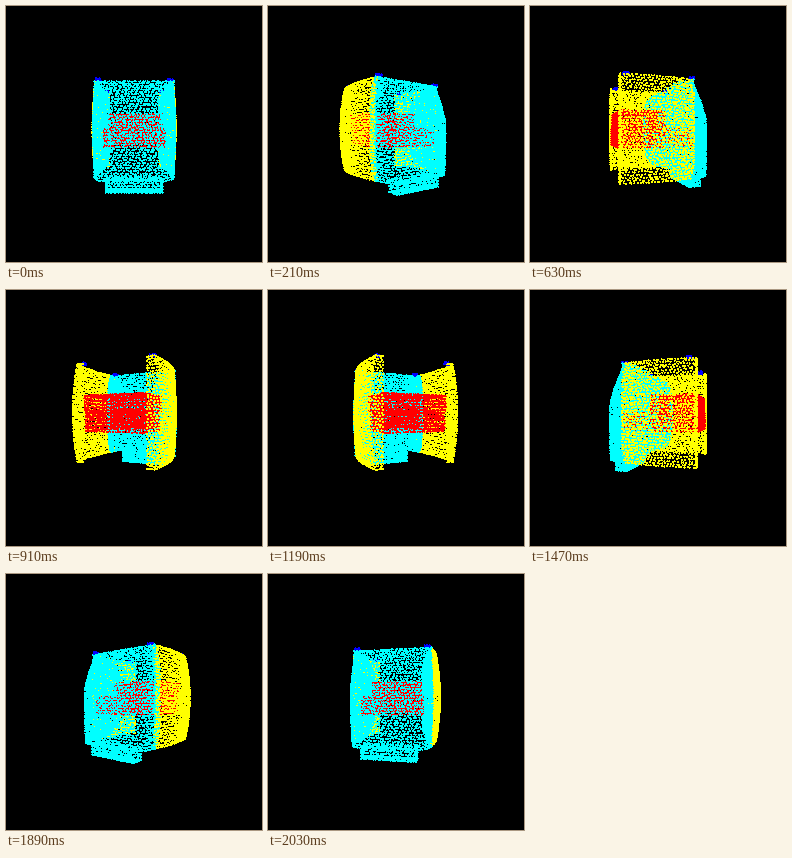
These frames come from a looping animation (256x256 px, 2.1 s). A matplotlib script:

```python
import numpy as np
import matplotlib.pyplot as plt
from matplotlib.animation import FuncAnimation

SIZE, STEPS, INTERVAL = 256, 30, 70
CAM, CX, CY = 220.0, 127.6, 125.7
DOT = 1.1
TOP, BOTTOM = -46.0, 40.5
BACK, FRONT = -43.0, 21.0
HEIGHT, LENGTH = BOTTOM - TOP, FRONT - BACK

CYAN, YELLOW = (0, 255, 255), (255, 255, 0)
RED, BLUE = (255, 0, 0), (0, 0, 255)

rng = np.random.default_rng(7)
parts = []


def grid(w, h, step=2.1):
    """Jittered, roughly even samples of the unit square for a w by h patch."""
    nu, nv = max(2, round(w / step)), max(2, round(h / step))
    u, v = np.meshgrid(np.linspace(0, 1, nu), np.linspace(0, 1, nv))
    u[1::2] += 0.5 / nu
    u = u + rng.uniform(-0.28, 0.28, u.shape) / nu
    v = v + rng.uniform(-0.28, 0.28, v.shape) / nv
    return np.clip(u, 0, 1).ravel(), np.clip(v, 0, 1).ravel()


def add(color, x, y, z):
    pts = np.stack(np.broadcast_arrays(x, y, z), axis=1).astype(float)
    parts.append((pts, np.tile(color, (len(pts), 1))))


def lerp(a, b, t):
    return a + (b - a) * t


def level(y):
    """Height within the body, -1 at the top to 1 at the bottom."""
    return 2 * (y - TOP) / HEIGHT - 1


def half_width(y, z):
    t = np.clip((FRONT - z) / LENGTH, 0, 1)
    return 37 + 18 * t - 14 * t ** 2 - (2 + 3 * t) * level(y) ** 2


def side_panel(side):
    u, v = grid(LENGTH, HEIGHT, 2.2)
    y, z = lerp(TOP, BOTTOM, v), lerp(BACK, FRONT, u)
    add(YELLOW, side * half_width(y, z), y, z)
    # Rear rim, turned inwards
    u, v = grid(11, HEIGHT, 2.2)
    y = lerp(TOP, BOTTOM, v)
    add(YELLOW, side * lerp(30, half_width(y, BACK), u), y, BACK)
    # Lining that runs inwards behind the shell
    u, v = grid(32, HEIGHT)
    y = lerp(TOP, BOTTOM, v)
    reach = u * np.sqrt(np.clip(1 - level(y) ** 4, 0, 1))
    add(CYAN, side * lerp(36, 25, reach), y, lerp(FRONT, -8, reach))


def front_shell():
    u, v = grid(98, HEIGHT)
    y = lerp(TOP, BOTTOM, v)
    rise = np.clip((y - TOP) / 40, 0, 1)
    depth = 18 * (1 - (1 - rise) ** 1.6)
    # Outline seen from above, walked by arc length
    px = np.array([-1, -0.96, -0.89, -0.72, 0, 0.72, 0.89, 0.96, 1])
    pz = np.array([0, 0.45, 0.8, 0.95, 1, 0.95, 0.8, 0.45, 0])
    s = np.r_[0, np.cumsum(np.hypot(np.diff(px * 37), np.diff(pz * 18)))]
    s /= s[-1]
    add(CYAN, half_width(y, FRONT) * np.interp(u, s, px), y,
        FRONT + depth * np.interp(u, s, pz))


def bumper():
    w, y0, y1, z0, z1 = 24, 40.5, 51, 23, 34
    for z in (z0, z1):
        u, v = grid(2 * w, y1 - y0)
        add(CYAN, lerp(-w, w, u), lerp(y0, y1, v), z)
    for x in (-w, w):
        u, v = grid(z1 - z0, y1 - y0)
        add(CYAN, x, lerp(y0, y1, v), lerp(z0, z1, u))
    u, v = grid(2 * w, z1 - z0)
    add(CYAN, lerp(-w, w, u), y1, lerp(z0, z1, v))


def bench(w, y0, y1, z0, z1):
    for z in (z0, z1):
        u, v = grid(2 * w, y1 - y0)
        add(RED, lerp(-w, w, u), lerp(y0, y1, v), z)
    for x in (-w, w):
        u, v = grid(z1 - z0, y1 - y0, 2.5)
        add(RED, x, lerp(y0, y1, v), lerp(z0, z1, u))
    u, v = grid(2 * w, z1 - z0, 3.2)
    add(RED, lerp(-w, w, u), y0, lerp(z0, z1, v))


def knob(x, z):
    n = 20
    add(BLUE, x + rng.uniform(-2.5, 2.5, n), rng.uniform(-48.5, -46.3, n),
        z + rng.uniform(-2.5, 2.5, n))


for side in (-1, 1):
    side_panel(side)
    knob(side * 32.5, 20)
    knob(side * 33, -38)
front_shell()
bumper()
bench(29, -18, -5, -42, -3)
bench(27, -3, 13, -43, 25)

points = np.concatenate([p for p, _ in parts])
colors = np.concatenate([c for _, c in parts]).astype(np.uint8)
off = np.array([(dx, dy) for dy in (-1, 0, 1) for dx in (-1, 0, 1)])


def render(i):
    a = 2 * np.pi * i / STEPS
    x, y, z = points.T
    far = z * np.cos(a) - x * np.sin(a)
    order = np.argsort(far)
    scale = CAM / (CAM - far)
    pos = np.stack([CX + (x * np.cos(a) + z * np.sin(a)) * scale,
                    CY + y * scale], axis=1)[order]
    # Round dots, painted from the farthest to the nearest
    cells = np.rint(pos)[:, None] + off
    inside = np.hypot(*np.moveaxis(cells - pos[:, None], 2, 0)) < DOT
    col, row = cells[inside].astype(int).T
    img = np.zeros((SIZE, SIZE, 3), np.uint8)
    img[row, col] = colors[order][np.nonzero(inside)[0]]
    return img


fig = plt.figure(figsize=(SIZE / 100, SIZE / 100), dpi=100, facecolor="black")
ax = fig.add_axes([0, 0, 1, 1])
ax.axis("off")
view = ax.imshow(render(0), interpolation="nearest", aspect="auto")


def update(i):
    view.set_data(render(i))
    return (view,)


anim = FuncAnimation(fig, update, frames=STEPS, interval=INTERVAL,
                     repeat=True, repeat_delay=0, blit=False)
plt.show()
```
